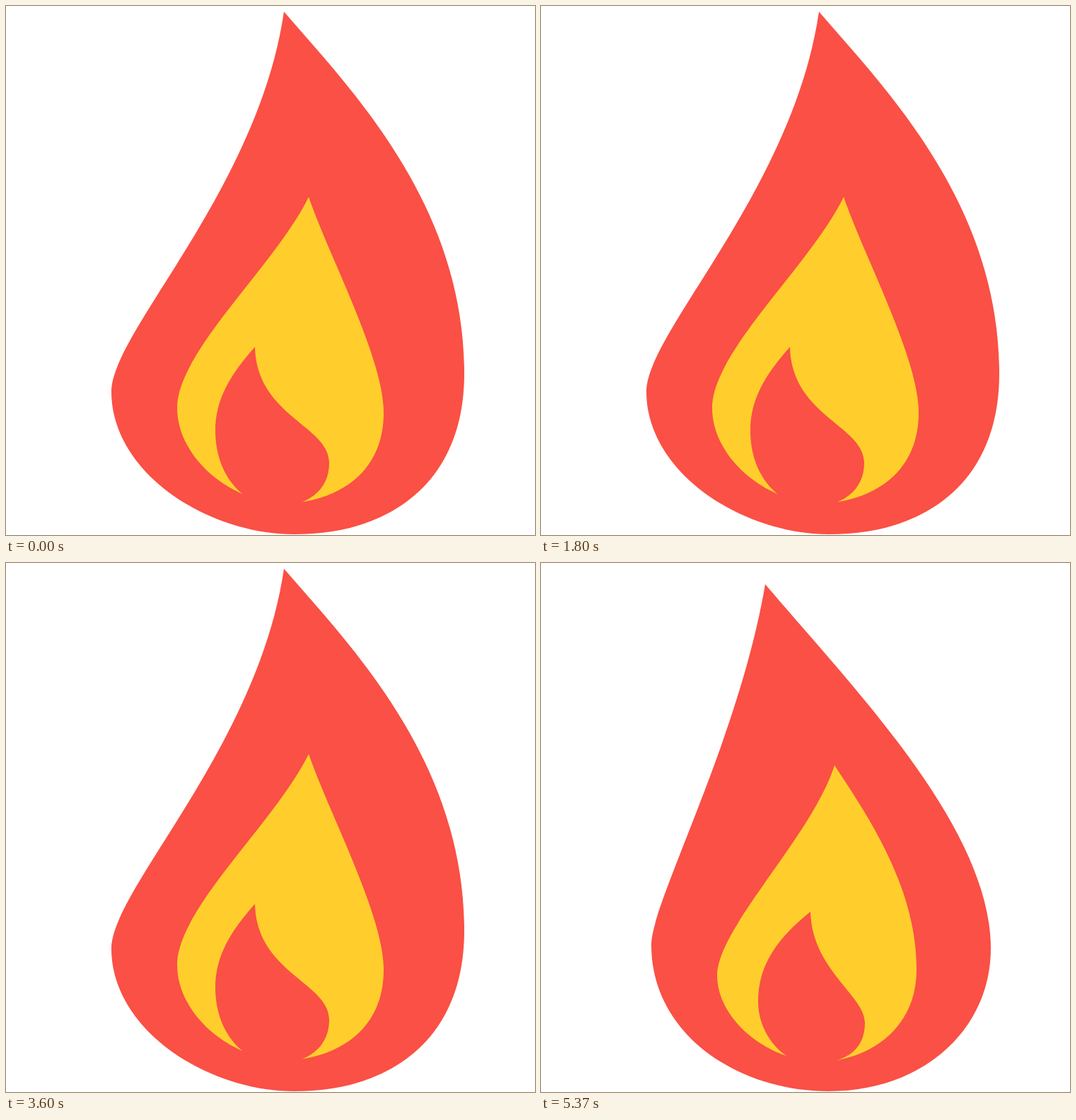
An HTML page that plays this animation: 748 by 748 pixels, repeating every 5410 ms.

```html
<!DOCTYPE html>
<html>
<head>
<meta charset="utf-8">
<style>
  html, body { margin: 0; width: 100%; height: 100%; overflow: hidden; background: #fff; }
  svg { display: block; width: 100vw; height: 100vh; }
</style>
</head>
<body>
<svg viewBox="0 0 748 748"></svg>
<script>
const LOOP = 5410, FRAME = 100 / 3, CYCLE = 18;
const RED = '#fa5045', YELLOW = '#ffce2c';

// Pose: tip x,y | right tip handle x,y | right x,y,upper,lower handle y |
// base x,y,right,left handle x | left x,y,upper,lower handle y | left tip handle x,y
const layers = [
  { color: RED, axis: 384, poses: {
    0: [393, 8, 490, 120, 648, 520, 282, 670, 407, 747, 548, 285, 149, 545, 462, 660, 357, 258],
    11: [261, 23, 262, 260, 624, 560, 418, 665, 407, 747, 525, 255, 129, 420, 225, 664, 180, 110],
    17: [317, 30, 440, 175, 636, 545, 374, 660, 407, 747, 540, 275, 156, 540, 480, 664, 280, 250] } },
  { color: YELLOW, axis: 386, poses: {
    0: [428, 270, 455, 350, 534, 575, 497, 675, 395, 703, 447, 320, 242, 568, 489, 640, 382, 365],
    11: [290, 284, 345, 370, 527, 590, 498, 659, 395, 704, 455, 310, 241, 570, 540, 655, 273, 370],
    17: [415, 286, 460, 355, 531, 575, 456, 668, 395, 705, 450, 320, 249, 583, 517, 645, 384, 385] } },
  { color: RED, axis: 380, poses: {
    0: [352, 482, 354, 580, 457, 646, 593, 686, 380, 708, 425, 345, 296, 600, 554, 672, 320, 518],
    11: [398, 494, 420, 527, 459, 635, 590, 690, 390, 708, 430, 345, 315, 645, 612, 680, 386, 545],
    17: [381, 493, 383, 575, 458, 650, 612, 693, 380, 708, 425, 345, 307, 620, 568, 668, 335, 530] } }
];

function expand([tx, ty, ax, ay, rx, ry, ru, rd, bx, by, br, bl, lx, ly, lu, ld, cx, cy]) {
  return [[tx, ty], [ax, ay], [rx, ru], [rx, ry], [rx, rd], [br, by],
          [bx, by], [bl, by], [lx, ld], [lx, ly], [lx, lu], [cx, cy]];
}

const mirror = (pts, axis) =>
  pts.map((_, i) => pts[(12 - i) % 12]).map(([x, y]) => [2 * axis - x, y]);

// Each pose returns mirrored half a cycle later.
function buildKeys({ poses, axis }) {
  const keys = [];
  for (const time in poses) {
    const pts = expand(poses[time]);
    keys.push({ time: +time, pts: pts.flat() });
    keys.push({ time: (+time + CYCLE / 2) % CYCLE, pts: mirror(pts, axis).flat() });
  }
  return keys.sort((a, b) => a.time - b.time);
}

// Periodic cubic interpolation between unevenly spaced keys.
function sample(keys, phase) {
  const n = keys.length;
  const key = i => keys[(i + n) % n];
  const gap = i => (key(i + 1).time - key(i).time + CYCLE) % CYCLE;
  let k = n - 1;
  while (keys[k].time > phase) k--;
  const h = gap(k), t = (phase - keys[k].time) / h;
  return keys[k].pts.map((p, j) => {
    const rate = i => (key(i + 1).pts[j] - key(i).pts[j]) / gap(i);
    const slope = i =>
      (rate(i - 1) * gap(i) + rate(i) * gap(i - 1)) / (gap(i) + gap(i - 1));
    const q = key(k + 1).pts[j], s = t * t * (3 - 2 * t);
    return p + (q - p) * s
      + h * t * (1 - t) * ((1 - t) * slope(k) - t * slope(k + 1));
  });
}

function outline(v) {
  const c = v.map(n => n.toFixed(2));
  return `M${c[0]} ${c[1]}C${c.slice(2).join(' ')} ${c[0]} ${c[1]}Z`;
}

const svg = document.querySelector('svg');
for (const layer of layers) {
  layer.keys = buildKeys(layer);
  layer.path = document.createElementNS(svg.namespaceURI, 'path');
  layer.path.setAttribute('fill', layer.color);
  svg.append(layer.path);
}

const start = performance.now();
function draw(now) {
  const time = Math.max(0, now - start) % LOOP;
  const step = Math.min(161, Math.floor((time + 3.4) / FRAME));
  for (const { path, keys } of layers)
    path.setAttribute('d', outline(sample(keys, step % CYCLE)));
  requestAnimationFrame(draw);
}
draw(start);
</script>
</body>
</html>
```
